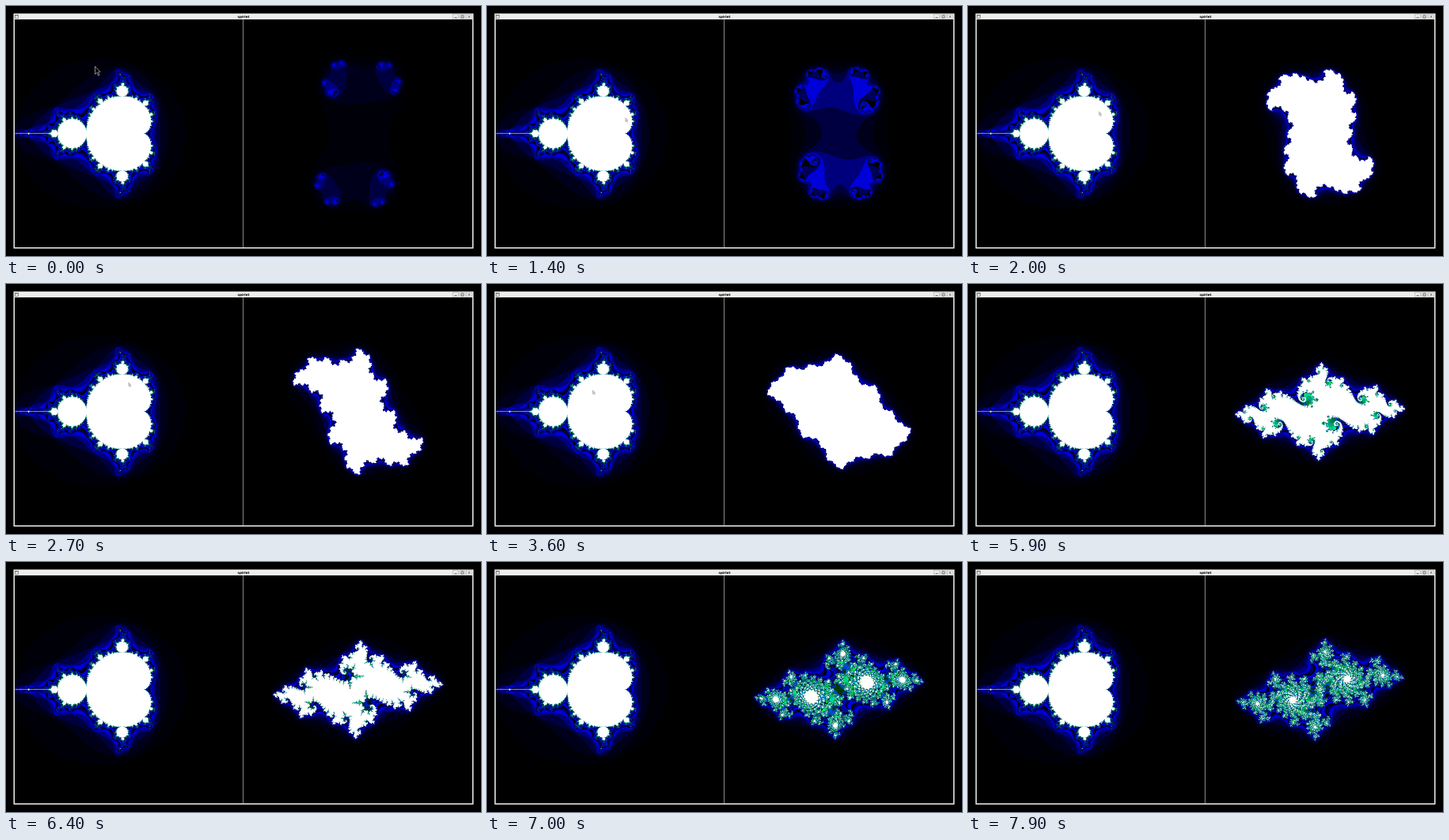
Recreate the animation shown at these times as an HTML page with a canvas. Size 600 by 317 pixels, loop 8000 ms.

```html
<!DOCTYPE html>
<html lang="en">
<head>
<meta charset="utf-8">
<title>Julia explorer</title>
<style>
  html, body { margin: 0; width: 100%; height: 100%; overflow: hidden; background: #000; }
  canvas, svg { position: absolute; left: 0; top: 0; width: 600px; height: 317px; }
  text { font: bold 4.1px "DejaVu Sans", sans-serif; fill: #000; text-anchor: middle; }
</style>
</head>
<body>
<canvas id="stage" width="600" height="317"></canvas>
<svg viewBox="0 0 600 317">
  <path fill="#eeeeea" fill-rule="evenodd" d="M9.5 9.5H590.5V307.5H9.5ZM11 17V306H589V17Z"/>
  <path stroke="#888" d="M299.5 17V306"/>
  <text x="300" y="14.7">spirlet</text>
  <g fill="none" stroke="#555" stroke-width=".6">
    <rect x="11.5" y="11.5" width="4" height="4"/>
    <path d="M11.5 12.3h4"/>
    <g stroke="#aaa">
      <rect x="564.5" y="10.8" width="7" height="5.2"/>
      <rect x="573" y="10.8" width="7" height="5.2"/>
      <rect x="581.5" y="10.8" width="7" height="5.2"/>
    </g>
    <path stroke="#222" d="M566.5 14.6h3M575 12h3v3h-3zM583.8 12.2l2.4 2.6m0-2.6l-2.4 2.6"/>
  </g>
</svg>
<script>
const LOOP = 8000, STEP = 100;
const SIZE = 578, HALF = SIZE / 2, UNIT = SIZE / 4;
const MAX = 100;

// [time, re, im]
const PARAM = [
  [700, .8, -.14], [1400, .5, .05], [2700, .084, .546], [4600, -.582, .294],
  [5900, -.744, -.09], [7000, -.7141, -.2555], [7900, -.6684, -.3619]
];
// [time, x, y]
const POINTER = [
  [0, 112, 76], [700, 146, 112], [1400, 174, 141], [2700, 154, 124],
  [4600, 109, 145], [5400, 101, 164]
];

const ctx = document.getElementById('stage').getContext('2d');
ctx.imageSmoothingQuality = 'high';

function at(keys, t) {
  let i = 0;
  while (i < keys.length - 2 && t > keys[i + 1][0]) i++;
  const [a, b] = [keys[i], keys[i + 1]];
  const k = Math.min(1, Math.max(0, (t - a[0]) / (b[0] - a[0])));
  return [a[1] + (b[1] - a[1]) * k, a[2] + (b[2] - a[2]) * k];
}

// The cube of the count, read as a 24-bit RGB value.
const palette = Uint32Array.from({ length: MAX + 1 }, (_, n) => {
  const rgb = n === MAX ? 0xffffff : Math.max(0, n - 1) ** 3;
  return 0xff000000 | (rgb & 255) << 16 | rgb & 0xff00 | rgb >> 16;
});

function escapeTime(x, y, cx, cy) {
  let n = 0, xx = x * x, yy = y * y;
  while (xx + yy <= 4 && n < MAX) {
    y = 2 * x * y + cy;
    x = xx - yy + cx;
    xx = x * x;
    yy = y * y;
    n++;
  }
  return n;
}

function makePanel() {
  const canvas = document.createElement('canvas');
  canvas.width = canvas.height = SIZE;
  const g = canvas.getContext('2d');
  const image = g.createImageData(SIZE, SIZE);
  const pixels = new Uint32Array(image.data.buffer);
  pixels.fill(0xff000000);
  return { canvas, pixels, flush: () => g.putImageData(image, 0, 0) };
}

// Both sets are symmetric, so only the upper half is computed.
function paint(panel, count, mirrorX) {
  for (let j = 1; j <= HALF; j++) {
    const im = (HALF - j) / UNIT;
    for (let i = 1; i < SIZE; i++) {
      const color = palette[count((i - HALF) / UNIT, im)];
      panel.pixels[j * SIZE + i] = color;
      panel.pixels[(SIZE - j) * SIZE + (mirrorX ? SIZE - i : i)] = color;
    }
  }
  panel.flush();
}

const mandelbrot = makePanel(), julia = makePanel();
paint(mandelbrot, (x, y) => escapeTime(0, 0, x, y), false);

function drawPointer(t) {
  if (t > 5300) return;
  const [x, y] = at(POINTER, t);
  const onDark = t < 700;
  ctx.save();
  ctx.translate(x, y);
  if (!onDark) {
    ctx.translate(.6, .4);
    ctx.scale(.5, .5);
  }
  ctx.beginPath();
  ctx.moveTo(.5, .5);
  for (const [px, py] of [[.5, 10.5], [2.8, 8.3], [4.6, 12.3], [6, 11.6], [4.4, 7.8], [7, 7.5]])
    ctx.lineTo(px, py);
  ctx.closePath();
  ctx.fillStyle = onDark ? '#000' : '#ccc';
  ctx.strokeStyle = '#999';
  ctx.lineWidth = .9;
  ctx.fill();
  ctx.stroke();
  ctx.restore();
}

let lastStep = -1, lastParam = '';

function frame() {
  const step = Math.floor(performance.now() % LOOP / STEP);
  if (step !== lastStep) {
    lastStep = step;
    const t = step * STEP;
    const [cx, cy] = at(PARAM, t);
    const key = cx + ',' + cy;
    if (key !== lastParam) {
      lastParam = key;
      paint(julia, (x, y) => escapeTime(x, y, cx, cy), true);
    }
    ctx.drawImage(mandelbrot.canvas, 11, 17, 289, 289);
    ctx.drawImage(julia.canvas, 300, 17, 289, 289);
    drawPointer(t);
  }
  requestAnimationFrame(frame);
}
frame();
</script>
</body>
</html>
```
